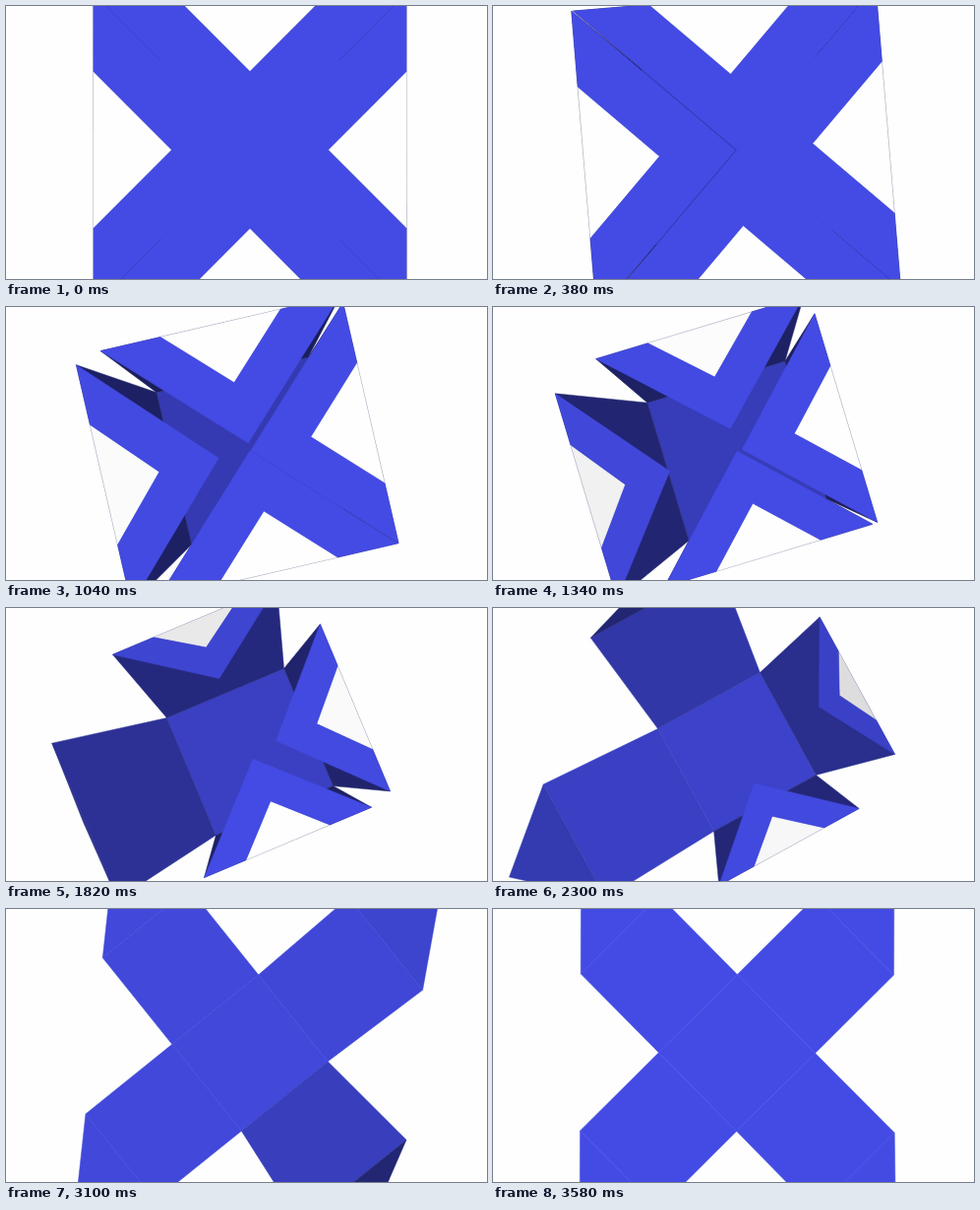
Recreate the animation shown at these times as an HTML page with a canvas. Size 489x277 px, loop 3600 ms.

```html
<!DOCTYPE html>
<html lang="en">
<head>
<meta charset="utf-8">
<title>Unfolding box</title>
<style>
  html, body { margin: 0; width: 100%; height: 100%; overflow: hidden; background: #fdfefd; }
  canvas { display: block; }
</style>
</head>
<body>
<canvas id="stage" width="489" height="277"></canvas>
<script>
const ctx = document.getElementById('stage').getContext('2d');
const LOOP = 3600, FOCAL = 430, CX = 248, CY = 146;
const BLUE = [68, 75, 228], WHITE = [253, 254, 253];
const { cos, sin, abs, PI } = Math;
const clamp = x => Math.min(1, Math.max(0, x));

function fill(points, color, light) {
  ctx.fillStyle = ctx.strokeStyle = `rgb(${color.map(c => Math.round(c * light))})`;
  ctx.beginPath();
  points.forEach(p => ctx.lineTo(...p));
  ctx.closePath();
  ctx.fill();
  ctx.stroke(); // hides hairlines between neighbouring faces
}

function draw(t) {
  const distance = 2.352 + 1.47 * (1 - (1 - t ** 2.25) ** 4.5);
  const inside = 0.69 + 0.31 * t;
  const scaleAt = height => FOCAL / (distance - height);

  ctx.fillStyle = '#fdfefd';
  ctx.fillRect(0, 0, 489, 277);
  ctx.lineWidth = 0.5;

  // r: distance from the axis, v: sideways offset, h: height above the base
  const projector = angle => (r, v, h) => {
    const s = scaleAt(h);
    return [CX + s * (r * cos(angle) - v * sin(angle)),
            CY + s * (r * sin(angle) + v * cos(angle))];
  };

  const flat = projector(-t * PI / 4);
  fill([flat(-.5, -.5, 0), flat(.5, -.5, 0), flat(.5, .5, 0), flat(-.5, .5, 0)], BLUE, inside);

  // Sides fall open one after another: left, top, right, bottom
  for (let i = 0; i < 4; i++) {
    const open = clamp((t - i * 0.1) / 0.7) ** 3;
    const wall = PI / 2 * (1 - open), cap = 2 * wall;
    const edge = 0.5 + cos(wall), top = sin(wall);
    const at = projector(PI + i * PI / 2 - t * PI / 4);
    const onCap = (v, q) => at(edge + q * cos(cap), v, top + q * sin(cap));

    fill([at(.5, -.5, 0), at(.5, .5, 0), at(edge, .5, top), at(edge, -.5, top)],
      BLUE, inside * (0.5 + 0.5 * cos(wall)));

    const tip = (edge + 0.5 * cos(cap)) * scaleAt(top + 0.5 * sin(cap));
    if (tip < edge * scaleAt(top)) {
      const light = 0.55 + 0.45 * abs(cos(cap));
      fill([onCap(-.25, 0), onCap(0, .25), onCap(.25, 0)], WHITE, light);
      fill([onCap(-.5, 0), onCap(0, .5), onCap(.5, 0),
            onCap(.25, 0), onCap(0, .25), onCap(-.25, 0)], BLUE, light);
    } else {
      fill([onCap(-.5, 0), onCap(0, .5), onCap(.5, 0)],
        BLUE, inside * (0.5 + 0.5 * abs(cos(cap))));
    }
  }
}

function tick() {
  draw(performance.now() % LOOP / LOOP);
  requestAnimationFrame(tick);
}
tick();
</script>
</body>
</html>
```
